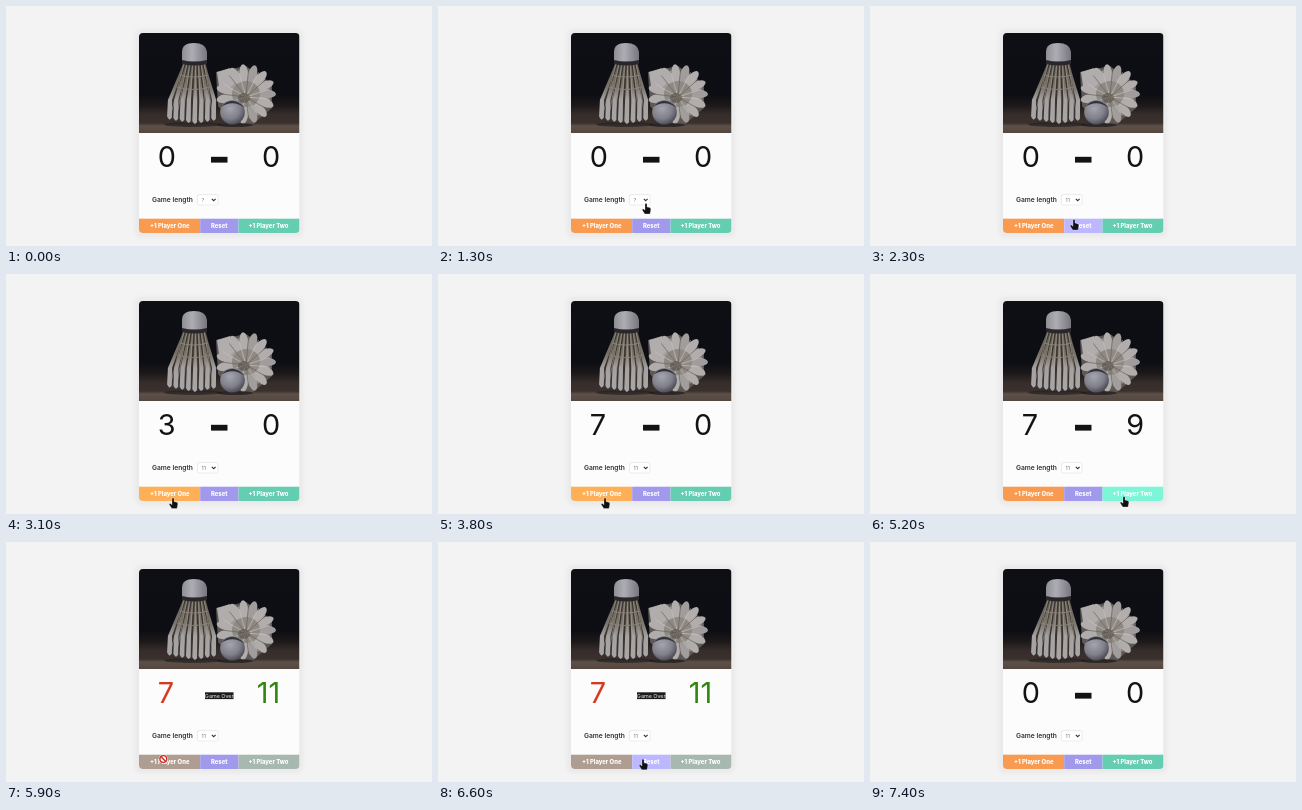
Animation, 426 px wide and 240 px high, one loop 7500 ms. Source, as an HTML page:

```html
<!DOCTYPE html>
<html lang="en">
<head>
<meta charset="utf-8">
<title>Score keeper</title>
<style>
  html, body { margin: 0; width: 100%; height: 100%; overflow: hidden; background: #f3f3f3; }
  svg { display: block; width: 100vw; height: 100vh; font-family: Inter, sans-serif; }
  .score { font-size: 28.8px; }
  .btn { font-size: 5.9px; font-weight: 800; fill: #fff; text-anchor: middle; }
</style>
</head>
<body>
<svg viewBox="0 0 426 240">
  <defs>
    <clipPath id="card"><rect x="133" y="27" width="160.5" height="200" rx="4"/></clipPath>
    <filter id="shadow" x="-10%" y="-10%" width="120%" height="120%"><feGaussianBlur stdDeviation="2"/></filter>
    <filter id="soft"><feGaussianBlur stdDeviation=".6"/></filter>
    <linearGradient id="back" x2="0" y2="1">
      <stop stop-color="#0e0f13"/><stop offset=".62" stop-color="#0d0e14"/>
      <stop offset=".72" stop-color="#1c1819"/><stop offset=".82" stop-color="#372e2b"/>
      <stop offset=".9" stop-color="#3a302d"/><stop offset=".93" stop-color="#5d5049"/>
      <stop offset="1" stop-color="#54473f"/>
    </linearGradient>
    <linearGradient id="cork">
      <stop stop-color="#8f8e96"/><stop offset=".4" stop-color="#aeadb3"/><stop offset="1" stop-color="#77767f"/>
    </linearGradient>
    <linearGradient id="vane" gradientUnits="userSpaceOnUse" x1="0" y1="58" x2="0" y2="118">
      <stop stop-color="#5f594e"/><stop offset=".4" stop-color="#7d776e"/>
      <stop offset=".6" stop-color="#a5a1a2"/><stop offset="1" stop-color="#a9a6ab"/>
    </linearGradient>
    <radialGradient id="ball" cx=".4" cy=".35" r=".7">
      <stop stop-color="#a4a4ae"/><stop offset=".6" stop-color="#80808b"/><stop offset="1" stop-color="#44434c"/>
    </radialGradient>
  </defs>

  <rect x="129" y="23" width="168" height="208" rx="6" fill="#e9e9e9" filter="url(#shadow)"/>
  <g clip-path="url(#card)">
    <rect x="133" y="27" width="160.5" height="200" fill="#fcfcfc"/>
    <rect x="133" y="27" width="160.5" height="100" fill="url(#back)"/>
    <g id="photo" filter="url(#soft)"></g>
    <rect id="b0" x="133" y="212.7" width="61.2" height="14.3"/>
    <rect id="b1" x="194.2" y="212.7" width="38.3" height="14.3"/>
    <rect id="b2" x="232.5" y="212.7" width="61" height="14.3"/>
  </g>

  <text id="s0" class="score" x="151.8" y="161.3"></text>
  <text id="s1" class="score" x="274.2" y="161.3" text-anchor="end"></text>
  <rect id="dash" x="205" y="150.8" width="16.5" height="5.8" fill="#131313"/>
  <g id="over">
    <rect x="199" y="150.3" width="28.5" height="6.8" fill="#1b1b1b"/>
    <text x="213.2" y="155.6" font-size="5.4" fill="#eee" text-anchor="middle">Game Over</text>
  </g>

  <text x="146" y="195.6" font-size="6.7" font-weight="600" fill="#333">Game length</text>
  <rect x="191.5" y="188.5" width="20.5" height="10.5" rx="1.5" fill="#fff" stroke="#e6e6e6" stroke-width=".8"/>
  <text id="length" x="195.5" y="195.7" font-size="5.3" fill="#757575"></text>
  <path d="M205.8 192.8l1.9 1.9 1.9-1.9" fill="none" stroke="#333" stroke-width="1.1"/>

  <text class="btn" x="163.7" y="222.1">+1 Player One</text>
  <text class="btn" x="213.2" y="222.1">Reset</text>
  <text class="btn" x="262.5" y="222.1">+1 Player Two</text>

  <g id="hand">
    <path d="M-1 .7Q0-.5 1 .7V3.7L4 4.4Q5 5 4.8 6.7L4 10.8H-1.2L-3.8 6.8Q-3.6 5.3-2.3 5.9L-1 7Z"
          fill="#111" stroke="#fff" stroke-opacity=".55" stroke-width=".5"/>
  </g>
  <path id="arrow" d="M0 0V9L2.1 7.1 3.5 10.3 4.9 9.7 3.5 6.6H6.3Z" fill="#fff" stroke="#111" stroke-width=".6"/>
  <g id="ban" fill="none">
    <circle r="3.4" fill="#fff" stroke="#fff" stroke-width="2.3"/>
    <path d="M-2.4-2.4L2.4 2.4" stroke="#cf2b23" stroke-width="1.4"/>
    <circle r="3.4" stroke="#cf2b23" stroke-width="1.4"/>
  </g>
</svg>
<script>
const $ = id => document.getElementById(id);
const shapes = [];
const path = (d, fill, extra = '') => shapes.push(`<path d="${d}" fill="${fill}" ${extra}/>`);
const line = (x1, y1, x2, y2, color, w) =>
  path(`M${x1} ${y1}L${x2} ${y2}`, 'none', `stroke="${color}" stroke-width="${w}"`);
const ellipse = (cx, cy, rx, ry, fill, extra = '') =>
  shapes.push(`<ellipse cx="${cx}" cy="${cy}" rx="${rx}" ry="${ry}" fill="${fill}" ${extra}/>`);

function uprightShuttle() {
  path('M177 57H200L211 113Q187 122 161 112Z', '#39342f');
  for (let i = 0; i < 8; i++) {
    const top = 178 + i * 2.9, x = 163.5 + i * 6.3;
    const y = 118 - Math.abs(i - 4) * 1.1;
    path(`M${top - .9} 58H${top + .9}L${x + 2.6} 94L${x + 2.3} ${y - 2}Q${x} ${y + 2} ${x - 2.4} ${y - 3}L${x - 1.6} 94Z`,
      'url(#vane)');
    line(top, 58, x, y, '#aaa59a', .6);
  }
  path('M174 69Q187 73 202 69M171 81Q187 86 204 81', 'none', 'stroke="#8b8579" stroke-width=".9"');
  path('M176 57V46Q176 37 188 37Q200 37 201 46V57Q188 60 176 57Z', 'url(#cork)');
  path('M176 54Q188 57 201 54V58Q188 61 176 58Z', '#29272a');
}

function lyingShuttle() {
  const cx = 240, cy = 88, petals = 15;
  path('M212 100L210 66L240 60L266 78L266 102L246 119L226 117Z', '#5d5853');
  for (let i = 0; i < petals; i++) {
    const a = i / petals * 2 * Math.PI;
    const x = cx + 20 * Math.cos(a), y = cy + 20 * Math.sin(a);
    ellipse(0, 0, 10, 4.4, i % 3 ? '#b1adac' : '#a19d9c',
      `transform="translate(${x} ${y}) rotate(${a * 180 / Math.PI})"`);
  }
  path('M211 66L224 62L232 73L222 84L213 80Z', '#b1adac');
  ellipse(cx, cy, 14, 13, '#8e8983');
  for (let i = 0; i < petals; i++) {
    const a = (i + .5) / petals * 2 * Math.PI;
    line(cx, cy + 3, cx + 25 * Math.cos(a), cy + 25 * Math.sin(a), i % 2 ? '#6a645c' : '#c4c0bb', .7);
  }
  ellipse(cx - 2, cy + 4, 6, 5, '#534d46', 'opacity=".6"');
  ellipse(229, 119, 18, 2, '#1d191a', 'opacity=".7"');
  ellipse(226.5, 106.3, 12.3, 12.3, 'url(#ball)');
  path('M215 101Q226 88 239 102Q227 93 215 101Z', '#34343a');
}

ellipse(187, 118.5, 29, 2.5, '#1d191a', 'opacity=".6"');
uprightShuttle();
lyingShuttle();
$('photo').innerHTML = shapes.join('');

// time, x, y of the pointer tip
const route = [
  [700, 403, 228], [800, 250, 222], [1100, 250, 222], [1200, 208, 197.2], [1900, 208, 197.2],
  [2300, 204, 213.3], [2600, 167, 223.8], [3800, 167, 223.8], [4200, 254, 222.3],
  [5500, 254, 222.3], [5900, 157.3, 217], [6000, 157.3, 217], [6500, 205, 217], [7400, 205, 217]
];
const colors = [['#f89a50', '#ffb057'], ['#a19aec', '#bcb7ff'], ['#65cdb1', '#7df6d7']];
const offColors = ['#b09d91', null, '#a7b8b1'];
const show = (id, on) => $(id).setAttribute('visibility', on ? 'visible' : 'hidden');
const count = (t, start, step, max) => Math.max(0, Math.min(max, Math.floor((t - start) / step) + 1));

function pointer(t) {
  const i = route.findIndex(k => t < k[0]);
  if (i < 1) return null;
  const [t0, x0, y0] = route[i - 1], [t1, x1, y1] = route[i];
  const p = (t - t0) / (t1 - t0), e = p * p * (3 - 2 * p);
  return [x0 + (x1 - x0) * e, y0 + (y1 - y0) * e];
}

function draw(t) {
  const reset = t >= 6800;
  const one = reset ? 0 : count(t, 2700, 150, 7);
  const two = reset ? 0 : count(t, 4300, 110, 11);
  const done = two === 11;
  $('s0').textContent = one;
  $('s1').textContent = two;
  $('s0').setAttribute('fill', done ? '#d43a20' : '#131313');
  $('s1').setAttribute('fill', done ? '#2e880d' : '#131313');
  show('dash', !done);
  show('over', done);
  $('length').textContent = t >= 1800 ? '11' : '?';

  const tip = pointer(t);
  let hover = -1, kind = '';
  if (tip) {
    const [x, y] = tip;
    if (y >= 213 && y < 227 && x >= 133 && x < 293) hover = x < 194 ? 0 : x < 232.5 ? 1 : 2;
    const onSelect = x > 191 && x < 212 && y > 188 && y < 199;
    kind = hover < 0 ? (onSelect ? 'hand' : 'arrow') : done && hover !== 1 ? 'ban' : 'hand';
    $(kind).setAttribute('transform', `translate(${x} ${y})`);
  }
  for (const id of ['hand', 'arrow', 'ban']) show(id, id === kind);
  colors.forEach((c, i) =>
    $('b' + i).setAttribute('fill', done && offColors[i] || c[+(hover === i)]));
}

function tick() {
  draw(Math.floor(performance.now() % 7500 / 100) * 100);
  requestAnimationFrame(tick);
}
tick();
</script>
</body>
</html>
```
